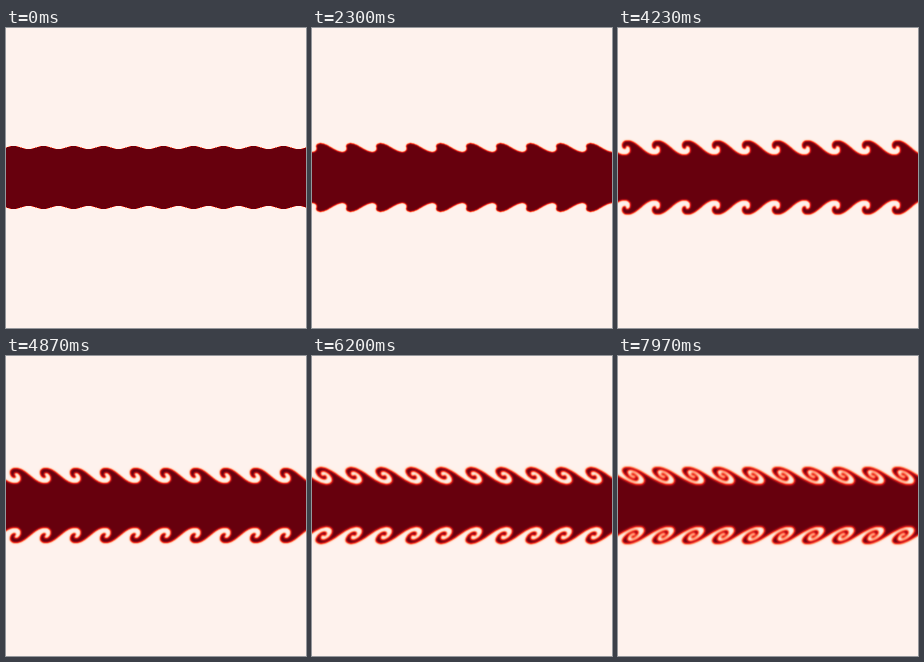
Animation, 300 px wide and 300 px high, one loop 8000 ms. Source, as an HTML page with a canvas:

```html
<!DOCTYPE html>
<html>
<head>
<meta charset="utf-8">
<title>Shear layer roll-up</title>
<style>
html, body { margin: 0; width: 100%; height: 100%; overflow: hidden; background: #fef2ed; }
canvas { display: block; }
</style>
</head>
<body>
<canvas id="c" width="300" height="300"></canvas>
<script>
const ctx = document.getElementById('c').getContext('2d');
const LOOP = 8000, FPS = 30;
const WAVE = 30, K = 2 * Math.PI / WAVE;   // wavelength in px
const SPEED = 4, DRIFT = 1.9;              // px per second
const CORE = 0.7;                          // widens the vortex cores
const EDGE = 119.5, TOP = 106, ROWS = 28;  // upper layer; the lower one mirrors it
const SS = 2, W = WAVE * SS, H = ROWS * SS;

const stops = ['fef2ed', 'fee0d2', 'fcbba1', 'fc9272', 'fb6a4a', 'ef3b2c', 'cb181d', 'a50f15', '67000d']
  .map(h => [0, 2, 4].map(i => parseInt(h.slice(i, i + 2), 16)));

function color(v) {
  const s = Math.min(Math.max(v, 0), 1) * (stops.length - 1);
  const i = Math.min(Math.floor(s), stops.length - 2);
  return stops[i].map((a, n) => a + (stops[i + 1][n] - a) * (s - i));
}

function smooth(v) {
  const s = Math.min(Math.max(v, 0), 1);
  return s * s * (3 - 2 * s);
}

const strength = t => 0.07 + 1.1 * smooth(t / 3);    // vortices form
const lean = t => 0.7 * smooth((t - 3.5) / 4.5);     // then stretch sideways

// Follow each sample back through the cat's-eye flow to the first interface
function trace(t) {
  const n = Math.ceil(t * 8), dt = n ? t / n : 0, step = SPEED * K * dt;
  const eps = Array.from({ length: 2 * n + 1 }, (_, i) => strength(t - i * dt / 2));
  const tilt = lean(t), field = new Float32Array(W * H);
  for (let j = 0; j < H; j++) for (let i = 0; i < W; i++) {
    let y = K * (EDGE - TOP - (j + 0.5) / SS);
    let x = K * ((i + 0.5) / SS - DRIFT * t) + tilt * y;
    for (let s = 0; s < n; s++) {
      let px = x, py = y;
      for (let half = 0; half < 2; half++) {
        const e = eps[2 * s + half], g = Math.exp(py), r = 1 / g;
        const f = step * (half ? 1 : 0.5) / ((g + r) / 2 + e * (CORE - Math.cos(px)));
        const dy = f * e * Math.sin(px);
        px = x + f * (g - r) / 2;
        py = y - dy;
      }
      x = px;
      y = py;
    }
    field[j * W + i] = y < K * 1.5 * Math.sin(x) ? 1 : 0;
  }
  return field;
}

function blur(src, sigma, vertical) {
  const r = Math.ceil(sigma * 3), out = new Float32Array(W * H);
  const kernel = [];
  let sum = 0;
  for (let d = -r; d <= r; d++) sum += kernel[d + r] = Math.exp(-d * d / (2 * sigma * sigma));
  for (let j = 0; j < H; j++) for (let i = 0; i < W; i++) {
    let v = 0;
    for (let d = -r; d <= r; d++) {
      const a = vertical ? i : (i + d + W) % W;
      const b = vertical ? Math.min(Math.max(j + d, 0), H - 1) : j;
      v += src[b * W + a] * kernel[d + r];
    }
    out[j * W + i] = v / sum;
  }
  return out;
}

function draw(t) {
  const sigma = SS * (0.15 + 0.38 * Math.sqrt(t));
  const field = blur(blur(trace(t), sigma, false), sigma, true);
  const img = ctx.createImageData(300, 300);
  const put = (x, y, c) => img.data.set([...c, 255], (y * 300 + x) * 4);

  ctx.fillStyle = '#fef2ed';
  ctx.fillRect(0, 0, 300, 300);
  ctx.fillStyle = '#67000d';
  ctx.fillRect(0, TOP + ROWS, 300, 299 - 2 * (TOP + ROWS));
  for (let j = 0; j < ROWS; j++) for (let i = 0; i < WAVE; i++) {
    const p = j * SS * W + i * SS;
    const c = color((field[p] + field[p + 1] + field[p + W] + field[p + W + 1]) / 4);
    for (let x = i; x < 300; x += WAVE) {
      put(x, TOP + j, c);
      put(x, 298 - TOP - j, c);
    }
  }
  ctx.putImageData(img, 0, 0, 0, TOP, 300, ROWS);
  ctx.putImageData(img, 0, 0, 0, 299 - TOP - ROWS, 300, ROWS);
}

let shown = -1;
const start = performance.now();
function tick() {
  const ms = Math.max(0, performance.now() - start) % LOOP;
  const frame = Math.min(Math.floor((ms + 4) * FPS / 1000), LOOP * FPS / 1000 - 1);
  if (frame !== shown) draw((shown = frame) / FPS);
  requestAnimationFrame(tick);
}
tick();
</script>
</body>
</html>
```
